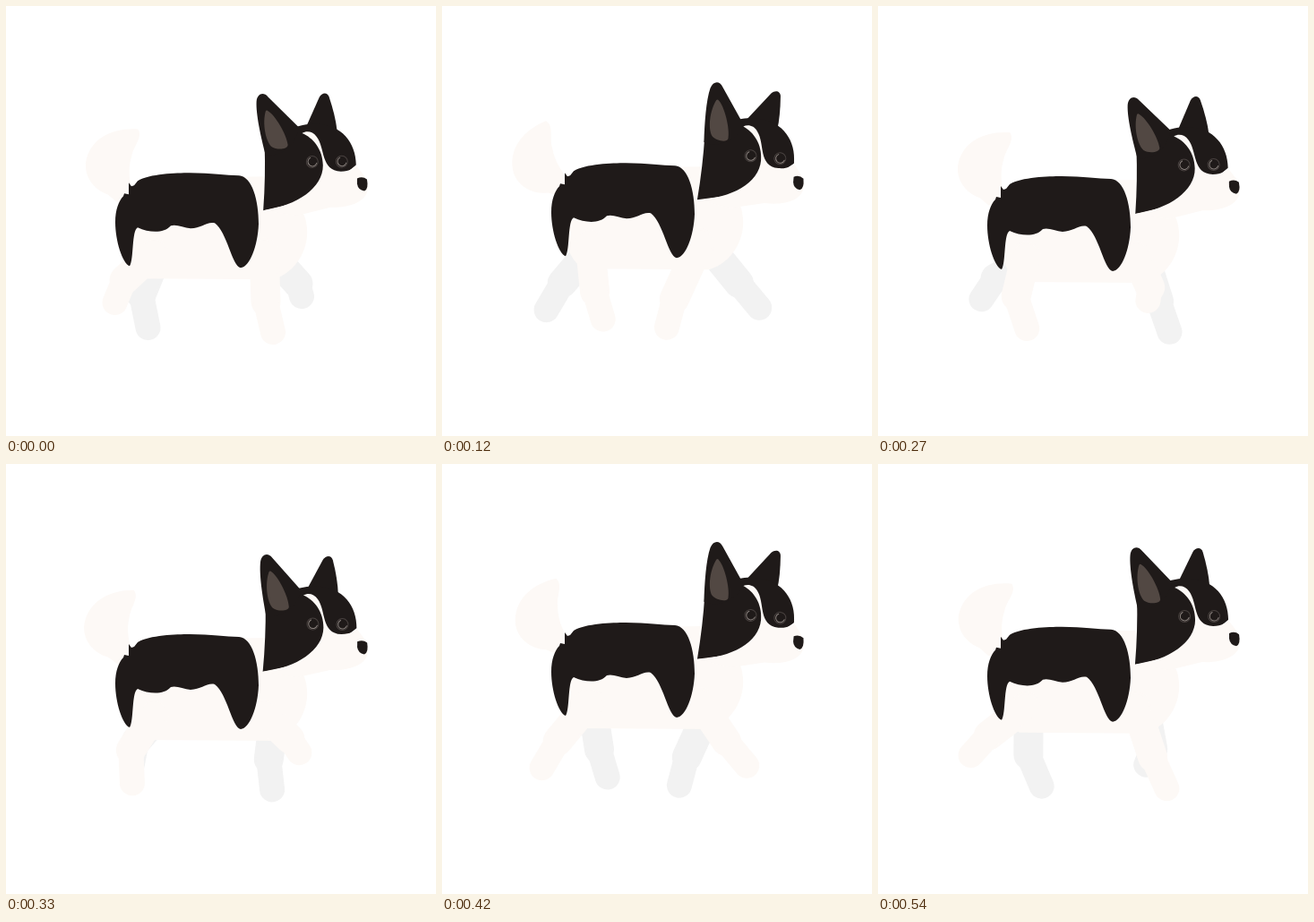
These frames come from a looping animation (480x480 px, 0.57 s). An HTML page:

```html
<!DOCTYPE html>
<html lang="en">
<head>
<meta charset="utf-8">
<title>Walking dog</title>
<style>
  html, body { margin: 0; height: 100%; overflow: hidden; background: #fff; }
  svg { display: block; width: 100vw; height: 100vh; }
  .dark { fill: #1f1a19; }
  .pale { fill: #fdf9f6; }
  .leg { fill: none; stroke-linecap: round; stroke-linejoin: round; }
  .near { stroke: #fdf9f6; }
  .far { stroke: #f2f2f2; }
  .eye { fill: none; stroke: #48413f; }
  .glint { fill: none; stroke: #8a827e; stroke-linecap: round; }
</style>
</head>
<body>
<svg viewBox="0 0 480 480">
  <g id="farLegs"></g>
  <g class="trunk">
    <path id="tail" class="pale" d="M145 137C118 136 92 148 88 176C87 194 100 207 114 211L124 219L143 219C139 198 134 186 139 167C141 155 151 146 145 137Z"/>
    <path class="pale" d="M135 212C128 245 135 290 158 304L298 305C325 297 338 270 336 248C335 235 331 228 325 222L292 190L160 192Z"/>
  </g>
  <g id="nearLegs"></g>
  <g class="trunk">
    <path class="dark" d="M137 197L140 201L143 200L147 195C160 187 190 186 205 186C230 186 245 189 260 189C275 190 282 217 282 243C281 268 272 291 262 292C252 290 247 252 233 242C224 240 218 248 206 248C198 247 190 243 184 245C176 254 160 253 147 247C140 250 143 283 138 290C130 287 122 262 122 241C122 227 126 217 131 212L132 209L137 210Z"/>
    <g id="head">
      <path id="farEar" class="dark" d="M334 138L351 102C354 97 360 96 362 102C366 115 369 128 370 140L352 150Z"/>
      <path class="dark" d="M289 155Q290 190 287 228L345 215L391 178C391 153 375 133 348 132C335 131 325 134 310 140Z"/>
      <path class="pale" d="M331 142C336 139 343 140 347 146C357 159 351 184 374 185C384 185 389 181 391 178C396 186 404 192 404 203C404 218 385 226 362 225L325 234L287 228C325 223 354 203 354 178C354 160 343 147 331 142Z"/>
      <path class="dark" d="M392 193Q398 190 403 194Q405 205 400 207Q393 206 392 199Z"/>
      <g id="nearEar">
        <path class="dark" d="M290 166C285 145 280 120 281 106C282 97 289 95 294 101L328 136C322 160 305 168 290 166Z"/>
        <path fill="#524843" d="M291 117C287 130 290 150 297 157C303 161 315 160 315 155C314 143 301 121 294 117Q292 115 291 117Z"/>
      </g>
      <circle class="eye" cx="342" cy="174" r="6.5"/>
      <path class="glint" d="M340 169.500a5 5 0 1 0 7 6"/>
      <circle class="eye" cx="375" cy="174" r="6.5"/>
      <path class="glint" d="M373 169.500a5 5 0 1 0 7 6"/>
    </g>
  </g>
</svg>
<script>
const STEP = 30, LOOP = 570;
const STRIDE = 600; // slightly longer than the loop
const $ = id => document.getElementById(id);

// Smooth periodic motion: mean plus two harmonics of the stride
const wave = (mean, c1, s1, c2 = 0, s2 = 0) => a =>
  mean + c1 * Math.cos(a) + s1 * Math.sin(a) + c2 * Math.cos(2 * a) + s2 * Math.sin(2 * a);

const bounce = wave(-4.2, -2.6, 0, 7);
const nod = wave(2.2, 0, 0, -2.6, 1.3);
const wag = wave(-8, 0, -5, 10, -6);

const hindStep = {
  knee: [wave(145, -7, 24, -6), wave(314, -8, 7.5)],
  foot: [wave(142, -16, 41, -4.5), wave(344, -14, 10, 1, 2)],
};
const foreStep = {
  knee: [wave(295, -11, -27, 6, -3), wave(320, 10, 6, 0, -3)],
  foot: [wave(301, -9, -44, 6, -1), wave(347, 20, 5, -3, -3)],
};

// Far legs make the same step half a stride later, a little further right
const legs = [
  { side: 'far', step: hindStep, hip: [168, 280], lag: Math.PI, shift: 5 },
  { side: 'far', step: foreStep, hip: [299, 280], lag: Math.PI, shift: 14 },
  { side: 'near', step: hindStep, hip: [165, 275], lag: 0, shift: 0 },
  { side: 'near', step: foreStep, hip: [288, 275], lag: 0, shift: 0 },
];

function addPath(leg, width) {
  const path = document.createElementNS('http://www.w3.org/2000/svg', 'path');
  path.setAttribute('class', 'leg ' + leg.side);
  path.setAttribute('stroke-width', width);
  $(leg.side + 'Legs').append(path);
  return path;
}
for (const leg of legs) {
  leg.thigh = addPath(leg, 33);
  leg.shin = addPath(leg, 28);
}

const rotate = (id, angle, x, y) =>
  $(id).setAttribute('transform', `rotate(${angle} ${x} ${y})`);

function draw(t) {
  const phase = 2 * Math.PI * t / STRIDE;
  const dy = bounce(phase);
  for (const g of document.querySelectorAll('.trunk'))
    g.setAttribute('transform', `translate(0 ${dy})`);

  const tilt = nod(phase);
  rotate('head', tilt, 298, 204);
  rotate('nearEar', tilt * 2, 304, 158);
  rotate('farEar', tilt * 2.5, 353, 137);
  rotate('tail', wag(phase), 135, 205);

  for (const { step, hip, lag, shift, thigh, shin } of legs) {
    const place = ([x, y]) => `${x(phase + lag) + shift} ${y(phase + lag)}`;
    const upper = `M${hip[0]} ${hip[1] + dy}L${place(step.knee)}`;
    thigh.setAttribute('d', upper);
    shin.setAttribute('d', `${upper}L${place(step.foot)}`);
  }
}

const start = performance.now();
function frame() {
  const t = (performance.now() - start) % LOOP;
  draw(Math.floor(t / STEP) * STEP);
  requestAnimationFrame(frame);
}
frame();
</script>
</body>
</html>
```
